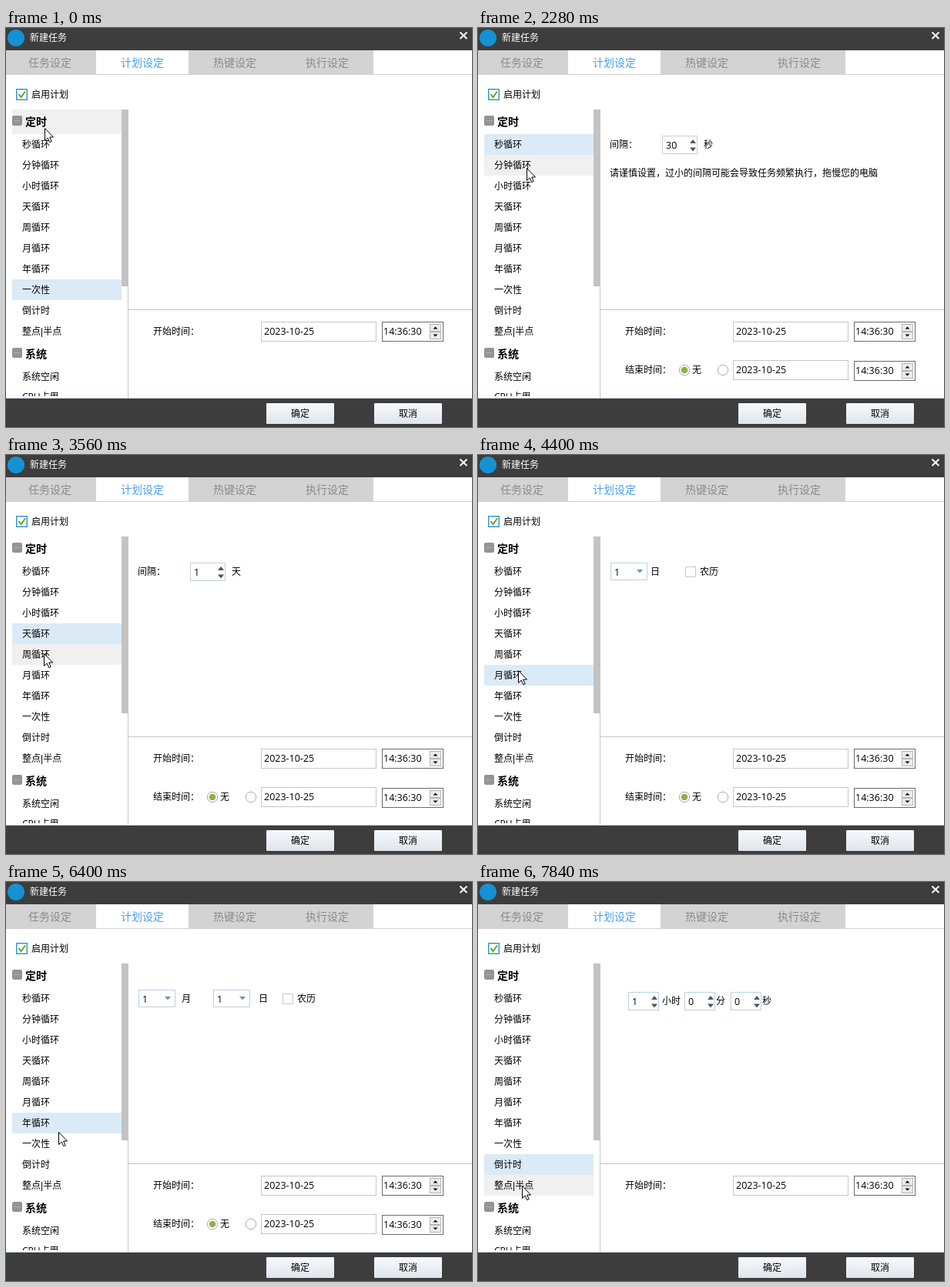
These frames come from a looping animation (605 px wide and 519 px high, 8000 ms). An HTML page:

```html
<!DOCTYPE html>
<html lang="zh-CN">
<head>
<meta charset="utf-8">
<title>新建任务</title>
<style>
html, body { margin: 0; width: 100%; height: 100%; overflow: hidden; background: #fff; }
svg { display: block; width: 100%; height: 100%; }
text {
  font: 12px "Open Sans", "Noto Sans CJK SC", "Noto Sans CJK", sans-serif;
  fill: #000; white-space: pre; user-select: none;
}
.num { font-size: 12.5px; }
.tab { font-size: 14px; fill: #8a8a8a; }
.tab.on { fill: #4aa0f0; }
.head { font-size: 14px; font-weight: bold; }
.bar { font-family: "Liberation Sans", sans-serif; }
</style>
</head>
<body>
<svg id="stage" viewBox="0 0 605 519" xmlns="http://www.w3.org/2000/svg">
  <linearGradient id="face" x2="0" y2="1">
    <stop stop-color="#f7f9fb"/><stop offset="1" stop-color="#dfe5ec"/>
  </linearGradient>
</svg>
<script>
const stage = document.getElementById('stage');
const LOOP = 8000, STEP = 60, ROW_TOP = 138, ROW_H = 27;

function el(parent, tag, attrs = {}, content) {
  const node = document.createElementNS('http://www.w3.org/2000/svg', tag);
  for (const key in attrs) node.setAttribute(key, attrs[key]);
  if (content !== undefined) node.textContent = content;
  parent.appendChild(node);
  return node;
}
const group = parent => el(parent, 'g');
const path = (p, d, attrs) => el(p, 'path', { d, ...attrs });
const rect = (p, x, y, width, height, fill, attrs) =>
  el(p, 'rect', { x, y, width, height, fill, ...attrs });
const frame = (p, x, y, w, h, stroke, fill = '#fff') =>
  rect(p, x + .5, y + .5, w - 1, h - 1, fill, { stroke });
// Text is placed by its left edge and vertical centre.
const label = (p, x, cy, str, cls = '', drop = 4.5) =>
  el(p, 'text', { x, y: cy + drop, class: cls }, str);
const tri = (p, x, y, w, h, fill) =>
  path(p, `M${x - w} ${y}H${x + w}L${x} ${y + h}Z`, { fill });

function spinner(p, x, y, w, value) {
  frame(p, x, y, w, 24, '#bcd0e6');
  label(p, x + 5, y + 12, value, 'num');
  tri(p, x + w - 6, y + 10, 4, -5, '#555');
  tri(p, x + w - 6, y + 15.5, 4, 5, '#555');
}
function combo(p, x, value) {
  frame(p, x, 140, 48, 23, '#bcd0e6');
  label(p, x + 5, 152, value, 'num');
  tri(p, x + 38, 149, 4, 4.5, '#6d93b5');
}
function checkbox(p, x, cy, text) {
  const box = frame(p, x, cy - 6.5, 14, 14, '#c9c9c9');
  label(p, x + 19, cy, text);
  return box;
}
function dateTime(p, y, timeY) {
  frame(p, 331, y, 150, 26, '#c6c6c6');
  label(p, 335, y + 12.5, '2023-10-25', 'num');
  frame(p, 488, timeY, 80, 26, '#6a6a6a');
  label(p, 490, timeY + 12.5, '14:36:30', 'num');
  for (const dy of [3, 13]) frame(p, 550, timeY + dy, 15, 10, '#b5b5b5', '#ececec');
  tri(p, 557.5, timeY + 9.5, 3, -3, '#000');
  tri(p, 557.5, timeY + 16.5, 3, 3, '#000');
}
function headRow(cy, text) {
  rect(stage, 8, cy - 8, 13, 13, '#949494', { rx: 2 });
  rect(stage, 11, cy - 2, 7, 1, '#b0b0b0');
  label(stage, 25, cy, text, 'head', 5);
}

// Window chrome
rect(stage, 0, 0, 605, 29, '#3d3d3d');
el(stage, 'circle', { cx: 13, cy: 13, r: 11, fill: '#1592d4' });
label(stage, 31, 12.5, '新建任务').style.fill = '#fff';
path(stage, 'M589.5 5.5L598.5 14M598.5 5.5L589.5 14', { stroke: '#fff', 'stroke-width': 2 });
rect(stage, 0, 29, 477, 32, '#d3d3d3');
rect(stage, 0, 60, 605, 1, '#cfcfcf');
rect(stage, 117, 29, 120, 31, '#fff');
['任务设定', '计划设定', '热键设定', '执行设定'].forEach((name, i) =>
  label(stage, 29 + 120 * i, 45, name, i === 1 ? 'tab on' : 'tab', 5));

frame(stage, 13, 79, 15, 15, '#2f93cc');
rect(stage, 14.5, 80.5, 12, 12, 'none', { stroke: '#9fd0ec' });
path(stage, 'M16.5 86L19.5 90L25 82.5', { fill: 'none', stroke: '#6aa51f', 'stroke-width': 2 });
label(stage, 33, 86.5, '启用计划');

// Sidebar
const hoverBox = rect(stage, 8, 0, 142, ROW_H, '#f0f0f0');
const pickBox = rect(stage, 8, 0, 142, ROW_H, '#dbeaf7');
headRow(122, '定时');
['秒循环', '分钟循环', '小时循环', '天循环', '周循环', '月循环', '年循环', '一次性', '倒计时']
  .forEach((name, i) => label(stage, 21, 151.5 + ROW_H * i, name));
const half = label(stage, 21, 394.5, '整点');
el(half, 'tspan', { class: 'bar' }, '|');
el(half, 'tspan', {}, '半点');
headRow(424, '系统');
label(stage, 21, 453.5, '系统空闲');
label(stage, 21, 479.5, 'CPU占用');
rect(stage, 0, 479, 158, 3, '#fff');
rect(stage, 150, 106, 9, 230, '#c3c3c3');
rect(stage, 158, 106, 1, 375, '#c6c6c6');
rect(stage, 158, 366, 447, 1, '#c6c6c6');
rect(stage, 0, 481, 605, 1, '#c9d4e8');

// Footer
rect(stage, 0, 482, 605, 37, '#3d3d3d');
[[338, '确定'], [478, '取消']].forEach(([x, text]) => {
  rect(stage, x, 488, 88, 27, 'url(#face)', { rx: 1 });
  label(stage, x + 32, 501.5, text);
});

// Start and end time
label(stage, 191, 394.5, '开始时间：');
dateTime(stage, 382, 382);
const endRow = group(stage);
label(endRow, 191, 444.5, '结束时间：');
for (const cx of [268, 318])
  el(endRow, 'circle', { cx, cy: 445, r: 6.7, fill: '#fff', stroke: '#aaa' });
el(endRow, 'circle', { cx: 268, cy: 445, r: 4.3, fill: '#8fb04a' });
label(endRow, 278, 444.5, '无');
dateTime(endRow, 432, 433);

// One panel for each kind of schedule
const panels = Array.from({ length: 9 }, () => group(stage));
[['30', '秒'], ['30', '分钟'], ['1', '小时'], ['1', '天']].forEach(([value, unit], i) => {
  label(panels[i], 171, 151.5, '间隔：');
  spinner(panels[i], 239, 140, 46, value);
  label(panels[i], 293, 151.5, unit);
});
label(panels[0], 171, 188.5, '请谨慎设置，过小的间隔可能会导致任务频繁执行，拖慢您的电脑');
[...'一二三四五六日'].forEach((day, i) =>
  checkbox(panels[4], Math.round(172 + 57.5 * i), 151.5, '星期' + day));
combo(panels[5], 172, '1');
label(panels[5], 224, 151.5, '日');
const lunar = checkbox(panels[5], 269, 151.5, '农历');
combo(panels[6], 172, '1');
label(panels[6], 228, 151.5, '月');
combo(panels[6], 269, '1');
label(panels[6], 328, 151.5, '日');
checkbox(panels[6], 359, 151.5, '农历');
[[195, '1', '小时', 239], [268, '0', '分', 309], [328, '0', '秒', 369]].forEach(([x, value, unit, ux]) => {
  spinner(panels[8], x, 143, 40, value);
  label(panels[8], ux, 154.5, unit);
});

// Pointers, both with the tip at 0,0
const pointer = group(stage);
const ink = { fill: '#fff', stroke: '#000', 'stroke-linejoin': 'round' };
const arrow = path(pointer, 'M.5 .5V16.5L4.2 13L6.8 18.7L9.2 17.6L6.7 12H11.5Z', ink);
const hand = group(pointer);
path(hand, 'M-2 2.3a1.9 1.9 0 0 1 3.8 0V8.5q3-1 3.6 1.2q2.8-.8 3.3 1.2q3-.3 3 2.2V17' +
  'q0 3-2 5V23.7H0V22L-5.4 15.5q-1-2 .6-2.6q1.4-.2 2.8 2Z', ink);
path(hand, 'M1.8 8V13M5.4 9.7V13M8.7 11V13.5', { stroke: '#000' });

// [ms, x, y]
const moves = [
  [0, 50, 130], [50, 50, 130], [170, 56, 152], [540, 56, 152], [1140, 425, 299],
  [1380, 555, 400], [1620, 400, 432], [1980, 240, 283], [2280, 63, 182], [2340, 63, 182],
  [2700, 57, 203], [2840, 57, 203], [3140, 54, 230], [3320, 54, 232], [3560, 49, 258],
  [3800, 49, 258], [4100, 52, 280], [4460, 52, 280], [4760, 60, 307], [5120, 60, 307],
  [5420, 300, 163], [5540, 298, 155], [5980, 64, 308], [6160, 64, 308], [6400, 68, 325],
  [6640, 66, 335], [7240, 66, 335], [7480, 62, 366], [7560, 62, 366], [7840, 57, 395], [LOOP, 57, 395]
];
// [ms, chosen row]
const picks = [[0, 7], [350, 0], [2400, 1], [2900, 2], [3320, 3], [3740, 4],
  [4400, 5], [6040, 6], [7000, 7], [7500, 8]];

const lastIndex = (list, t) => {
  let i = list.length - 1;
  while (i > 0 && list[i][0] > t) i--;
  return i;
};
const show = (node, on) => node.setAttribute('visibility', on ? 'visible' : 'hidden');

function place(t) {
  const i = Math.min(lastIndex(moves, t), moves.length - 2);
  const [t0, x0, y0] = moves[i], [t1, x1, y1] = moves[i + 1];
  const u = Math.floor((t - t0) / STEP) * STEP / (t1 - t0);
  return [Math.round(x0 + (x1 - x0) * u), Math.round(y0 + (y1 - y0) * u)];
}

function draw(t) {
  const [x, y] = place(t);
  const pick = picks[lastIndex(picks, t)][1];
  pickBox.setAttribute('y', ROW_TOP + ROW_H * pick);
  panels.forEach((panel, i) => show(panel, i === pick));
  show(endRow, pick < 7);

  const row = Math.floor((y - ROW_TOP) / ROW_H);
  show(hoverBox, x >= 8 && x < 150 && y >= 106 && row < 10 && row !== pick);
  hoverBox.setAttribute('y', row < 0 ? 106 : ROW_TOP + ROW_H * row);
  hoverBox.setAttribute('height', row < 0 ? 32 : ROW_H);

  const onLunar = pick === 5 && x >= 268 && x < 313 && y >= 140 && y < 166;
  lunar.setAttribute('stroke', onLunar ? '#2b9fe6' : '#c9c9c9');
  lunar.setAttribute('stroke-width', onLunar ? 2 : 1);
  show(arrow, !onLunar);
  show(hand, onLunar);
  pointer.setAttribute('transform', `translate(${x} ${y})`);
}

const start = performance.now();
function tick() {
  draw((performance.now() - start) % LOOP);
  requestAnimationFrame(tick);
}
tick();
</script>
</body>
</html>
```
